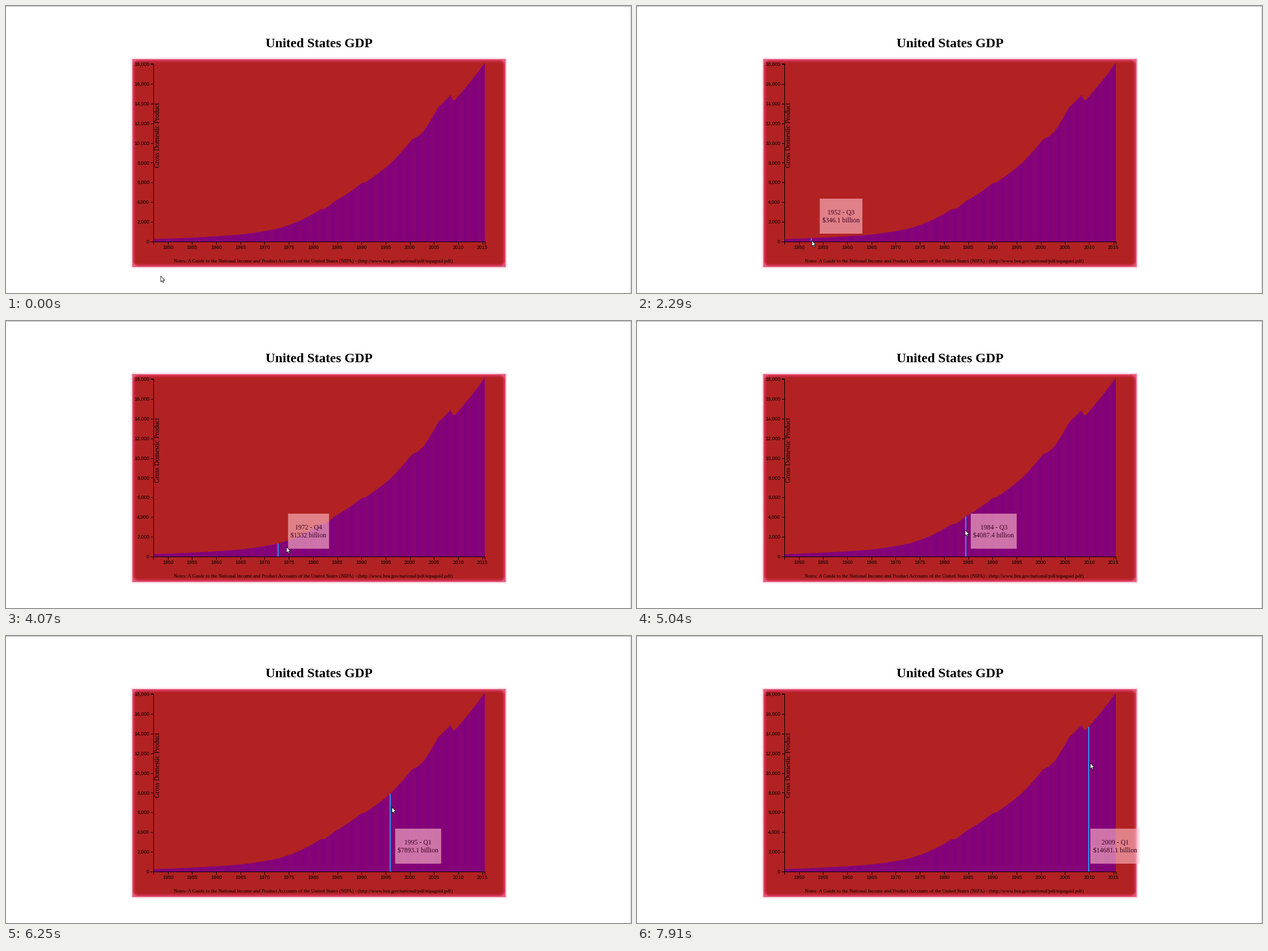
Write a matplotlib script that moves like this. It is 1103 px wide and 508 px high and loops after 8000 ms.

```python
import numpy as np
import matplotlib.pyplot as plt
from matplotlib.animation import FuncAnimation
from matplotlib.collections import LineCollection, PolyCollection
from matplotlib.patches import Polygon, Rectangle

W, H, DPI = 1103, 508, 64
PT = 72 / DPI                      # points per pixel
LOOP, INTERVAL = 8000, 40
LEFT, RIGHT, BASE = 260, 845, 417  # plot area
BARS = 275
BAR_W = (RIGHT - LEFT) / BARS
PEAK, SPAN = 18064.7, 315.1

# Turning points of the curve; growth is exponential between them
YEARS, GDP = np.transpose([
    (1947, 243.1), (1947.75, 260.3), (1959, 511.1), (1965, 719),
    (1972.75, 1332), (1978.75, 2482), (1981.5, 3264), (1982.5, 3331),
    (1984.5, 4087.4), (1990, 5890), (1991, 6054), (1996, 7893.1),
    (2000.5, 10357), (2001.75, 10660), (2003, 11230), (2006, 13649),
    (2008.5, 14843), (2009, 14384), (2009.5, 14384), (2010, 14681.1),
    (2015.5, PEAK)])
values = np.exp(np.interp(1947 + np.arange(BARS) / 4, YEARS, np.log(GDP)))

# Pointer moves: first step, last step, step count, then bar and pointer reached
MOVES = [
    (150, 610, 4, 3, 35, 452), (763, 1070, 3, 3, 266, 419),
    (1200, 1360, 2, 3, 267, 416), (1890, 2860, 8, 41, 350, 414),
    (2990, 2990, 1, 48, 367, 412), (3124, 3930, 7, 92, 472, 405),
    (4070, 4070, 1, 103, 495, 400), (4209, 5040, 7, 150, 579, 370),
    (5310, 6250, 8, 196, 681, 303), (6410, 7200, 7, 237, 767, 253),
    (7500, 7910, 4, 252, 800, 225)]
HOVER, FULL = 1200, 1360           # tooltip starts to show, is fully shown

ARROW = 0.63 * np.array([(0, 0), (0, 16.4), (3.7, 12.9), (6.2, 18.4),
                         (8.6, 17.4), (6.3, 11.9), (11.4, 11.9)])


def build_track():
    """Rows of time, bar, pointer x, pointer y; each holds until the next."""
    rows = [(0, 3, 273, 478)]
    for start, end, n, *goal in MOVES:
        here = rows[-1][1:]
        path = np.linspace(here, goal, n + 1)[1:]
        rows += [(t, *p) for t, p in zip(np.linspace(start, end, n), path)]
    return np.array(rows)


def gdp_y(v):
    return BASE - v / PEAK * SPAN


def year_x(year):
    return LEFT + (year - 1947) / 68.5 * (RIGHT - LEFT)


def backdrop():
    """White page with the glowing red card."""
    y, x = np.mgrid[:H, :W] + 0.5
    dx, dy = abs(x - 552.3) - 324.7, abs(y - 278) - 179

    def distance(grow):
        return np.hypot(np.maximum(dx - grow, 0), np.maximum(dy - grow, 0))

    rim, r = 4.5, 6
    d = np.where(np.maximum(dx, dy) > rim, rim + distance(rim),
                 np.minimum(distance(-r) - r, rim - 0.2))
    stops = [-1.5, 0.5, 2.5, 4.3, 5, 6.5, 9]
    colors = np.array([(178, 34, 34), (196, 40, 60), (213, 52, 84),
                       (226, 92, 122), (250, 200, 212), (255, 232, 238),
                       (255, 255, 255)])
    img = np.stack([np.interp(d, stops, c) for c in colors.T], axis=-1)
    img[0] = 172
    img[:, -1] = 205
    return img.astype(np.uint8)


fig = plt.figure(figsize=(W / DPI, H / DPI), dpi=DPI, facecolor='white')
fig.figimage(backdrop(), zorder=-1)
ax = fig.add_axes([0, 0, 1, 1], zorder=1)
ax.set(xlim=(0, W), ylim=(H, 0))
ax.axis('off')


def label(x, y, s, px, ha='center', family='Liberation Serif', **kw):
    return ax.text(x, y, s, fontsize=px * PT, ha=ha, va='baseline',
                   family=family, **{'color': 'black', **kw})


# Bars
x0 = LEFT + np.arange(BARS) * BAR_W
x1, top, base = x0 + BAR_W, gdp_y(values), np.full(BARS, BASE)
corners = np.array([(x0, base), (x0, top), (x1, top), (x1, base)])
ax.add_collection(PolyCollection(corners.transpose(2, 0, 1), facecolor='purple',
                                 linewidth=0, snap=False, zorder=1))

# Axes
lines = [[(255, 102), (259.5, 102), (259.5, BASE), (255, BASE)],
         [(LEFT, 421.5), (LEFT, BASE), (RIGHT, BASE), (RIGHT, 421.5)]]
for v in range(0, 18001, 2000):
    y = gdp_y(v)
    lines.append([(255, y), (259.5, y)])
    label(253, y + 2.9, f'{v:,}', 8.8, 'right', 'Liberation Sans')
for year in range(1950, 2016, 5):
    x = year_x(year)
    lines.append([(x, BASE), (x, 421.5)])
    label(x, 430, str(year), 8.8, family='Liberation Sans')
ax.add_collection(LineCollection(lines, colors='black', linewidths=PT, zorder=2))

label(552, 73, 'United States GDP', 23.46, weight='bold')
label(271, 171, 'Gross Domestic Product', 11.73, 'right',
      rotation=90, rotation_mode='anchor')
label(542, 454, 'Notes: A Guide to the National Income and Product Accounts of '
      'the United States (NIPA) - '
      '(http://www.bea.gov/national/pdf/nipaguid.pdf)', 8.8)

# Moving parts
mark = ax.add_patch(Rectangle((0, 0), BAR_W, 1, facecolor='#2a90ee',
                              linewidth=0, snap=False, zorder=4))
tip = ax.add_patch(Rectangle((0, 0), 1, 1, facecolor='pink', linewidth=0,
                             snap=False, zorder=5))
tip_text = [label(0, y, '', 11.73, color='#3a0422', zorder=6)
            for y in (369.3, 382.8)]
arrow = ax.add_patch(Polygon(ARROW, facecolor='white', edgecolor='black',
                             linewidth=0.75 * PT, snap=False, zorder=7))
track = build_track()


def draw(k):
    t = k * INTERVAL + 30
    now, bar, *pointer = track[np.searchsorted(track[:, 0], t, 'right') - 1]
    arrow.set_xy(ARROW + pointer)

    shown = now >= HOVER
    for part in (mark, tip, *tip_text):
        part.set_visible(shown)
    if shown:
        i = round(bar)
        fade = 0.5 if now < FULL else 1
        x, y = LEFT + i * BAR_W, gdp_y(values[i])
        mark.set_bounds(x, y, BAR_W, BASE - y)

        # First quarters carry the previous year's number
        quarter = i % 4 + 1
        year = 1947 + i // 4 - (quarter == 1)
        money = f'${round(values[i], 1):g}'
        dots = money.count('.')
        width = 43 + 5.87 * (len(money) - dots) + 2.93 * dots
        right = x + 91
        tip.set_bounds(right - width, 341, width, 62)
        tip.set_alpha(0.6 * fade)
        for text, s in zip(tip_text, (f'{year} - Q{quarter}', f'{money} billion')):
            text.set(x=right - width / 2, text=s.replace('$', r'\$'), alpha=fade)
    return arrow, mark, tip, *tip_text


anim = FuncAnimation(fig, draw, frames=LOOP // INTERVAL, interval=INTERVAL,
                     repeat=True, repeat_delay=0)
plt.show()
```
